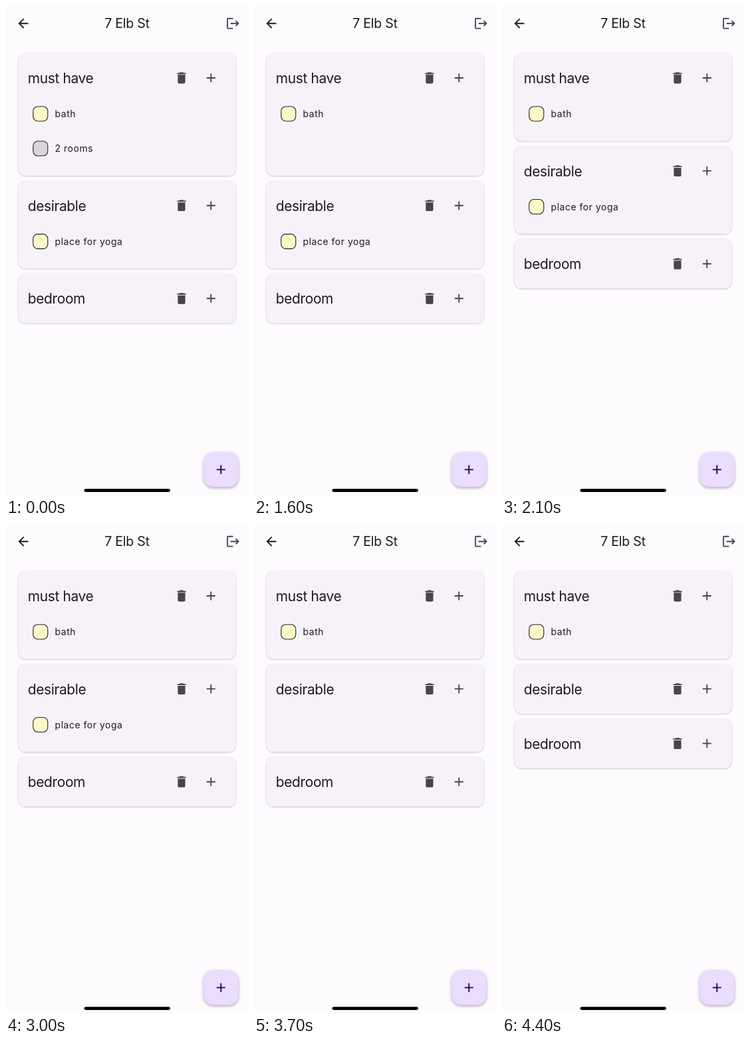
Animation, 364 px wide and 736 px high, one loop 5.3 s. Source, as an HTML page with a canvas:

```html
<!DOCTYPE html>
<html lang="en">
<head>
<meta charset="utf-8">
<title>Checklist</title>
<style>
  html, body { margin: 0; width: 100%; height: 100%; overflow: hidden; background: #fdfbfe; }
  canvas { display: block; width: 364px; height: 736px; }
</style>
</head>
<body>
<canvas id="stage"></canvas>
<script>
const W = 364, H = 736, LOOP = 5300, STEP = 100;
const HEADER = 74.7, ROW = 52.1, PAD = 5.5, GAP = 7.3;
const INK = '#1d1b20', MUTED = '#48434c', YELLOW = '#fcf8c8', GREY = '#d9d5dc';

const canvas = document.getElementById('stage');
const ctx = canvas.getContext('2d');
const ratio = window.devicePixelRatio || 1;
canvas.width = W * ratio;
canvas.height = H * ratio;

const icons = {
  back: new Path2D('M20 11H7.83l5.59-5.59L12 4l-8 8 8 8 1.41-1.41L7.83 13H20z'),
  exit: new Path2D('M17 7l-1.41 1.41L18.17 11H8v2h10.17l-2.58 2.58L17 17l5-5zM4 5h8V3H4c-1.1 0-2 .9-2 2v14c0 1.1.9 2 2 2h8v-2H4z'),
  trash: new Path2D('M6 19c0 1.1.9 2 2 2h8c1.1 0 2-.9 2-2V7H6zM19 4h-3.5l-1-1h-5l-1 1H5v2h14z'),
  plus: new Path2D('M19 13h-6v6h-2v-6H5v-2h6V5h2v6h6z')
};

// Swipe: starts at `slide` with `from` px, moves `pace` px per step, gone at `gone`.
// Then the row closes between `close` and `closed`.
const lists = [
  { title: 'must have', items: [
    { label: 'bath', color: YELLOW },
    { label: '2 rooms', color: GREY,
      swipe: { slide: 1200, from: 36, pace: 30, gone: 1600, close: 1700, closed: 2100 } }
  ] },
  { title: 'desirable', items: [
    { label: 'place for yoga', color: YELLOW,
      swipe: { slide: 3300, from: 25, pace: 42, gone: 3700, close: 4000, closed: 4400 } }
  ] },
  { title: 'bedroom', items: [] }
];

const clamp = v => Math.min(1, Math.max(0, v));

// CSS "ease": cubic-bezier(.25, .1, .25, 1)
function ease(x) {
  if (x <= 0 || x >= 1) return clamp(x);
  const bezier = (a, b, s) => 3 * a * s * (1 - s) ** 2 + 3 * b * s * s * (1 - s) + s ** 3;
  let lo = 0, hi = 1;
  for (let i = 0; i < 20; i++) {
    const mid = (lo + hi) / 2;
    if (bezier(.25, .25, mid) < x) lo = mid; else hi = mid;
  }
  return bezier(.1, 1, lo);
}

function text(str, x, y, size, spacing = 0, align = 'left') {
  ctx.font = `400 ${size}px Inter, "Noto Sans", sans-serif`;
  ctx.letterSpacing = spacing + 'px';
  ctx.textAlign = align;
  ctx.fillStyle = INK;
  ctx.fillText(str, x, y);
}

function icon(name, cx, cy, color) {
  const scale = .933;
  ctx.save();
  ctx.translate(cx - 12 * scale, cy - 12 * scale);
  ctx.scale(scale, scale);
  ctx.fillStyle = color;
  ctx.fill(icons[name]);
  ctx.restore();
}

function box(x, y, w, h, radius, color) {
  ctx.beginPath();
  ctx.roundRect(x, y, w, h, radius);
  ctx.fillStyle = color;
  ctx.fill();
}

function raised(x, y, w, h, radius, color, blur, drop, alpha) {
  ctx.save();
  ctx.shadowColor = `rgba(0, 0, 0, ${alpha})`;
  ctx.shadowBlur = blur * ratio;
  ctx.shadowOffsetY = drop * ratio;
  box(x, y, w, h, radius, color);
  ctx.restore();
}

function rowHeight({ swipe }, t) {
  if (!swipe) return ROW;
  return ROW * (1 - ease((t - swipe.close) / (swipe.closed - swipe.close)));
}

function drawItem({ label, color, swipe }, cy, t) {
  if (swipe && t >= swipe.gone) return;
  const shift = swipe && t >= swipe.slide
    ? swipe.from + swipe.pace * (t - swipe.slide) / STEP : 0;
  box(40.8 - shift, cy - 11, 22, 22, 7, color);
  ctx.strokeStyle = '#252329';
  ctx.lineWidth = 1.1;
  ctx.stroke();
  text(label, 73.6 - shift, cy + 5.3, 14, .5);
}

function drawList({ title, items }, top, t) {
  const rows = items.map(item => rowHeight(item, t));
  const body = rows.reduce((sum, h) => sum + h, 0);
  const height = HEADER + body + (body > 0 ? PAD : 0);
  const mid = top + 37.3;
  raised(18.5, top, 327.3, height, 11, '#f7f2fa', 2, .6, .28);
  text(title, 32.8, mid + 8, 21, -.4);
  icon('trash', 264, mid, MUTED);
  icon('plus', 308.3, mid, MUTED);
  let y = top + HEADER - 9.5;
  items.forEach((item, i) => {
    drawItem(item, y + ROW / 2, t);
    y += rows[i];
  });
  return top + height + GAP;
}

function draw(t) {
  ctx.setTransform(ratio, 0, 0, ratio, 0, 0);
  ctx.fillStyle = '#fdfbfe';
  ctx.fillRect(0, 0, W, H);

  icon('back', 26, 26.2, INK);
  text('7 Elb St', W / 2, 33.3, 19.7, -.3, 'center');
  icon('exit', 341.5, 26.2, MUTED);

  lists.reduce((top, list) => drawList(list, top, t), 70.7);

  raised(297.3, 670.3, 52.3, 52.3, 15, '#eaddff', 4, 1.5, .35);
  icon('plus', 323.3, 696.4, '#21005d');
  box(117.5, 725.2, 129.5, 4.8, 2.4, '#000');
}

const start = performance.now();
function tick() {
  const t = (performance.now() - start) % LOOP;
  draw(Math.floor(t / STEP) * STEP);
  requestAnimationFrame(tick);
}
tick();
</script>
</body>
</html>
```
